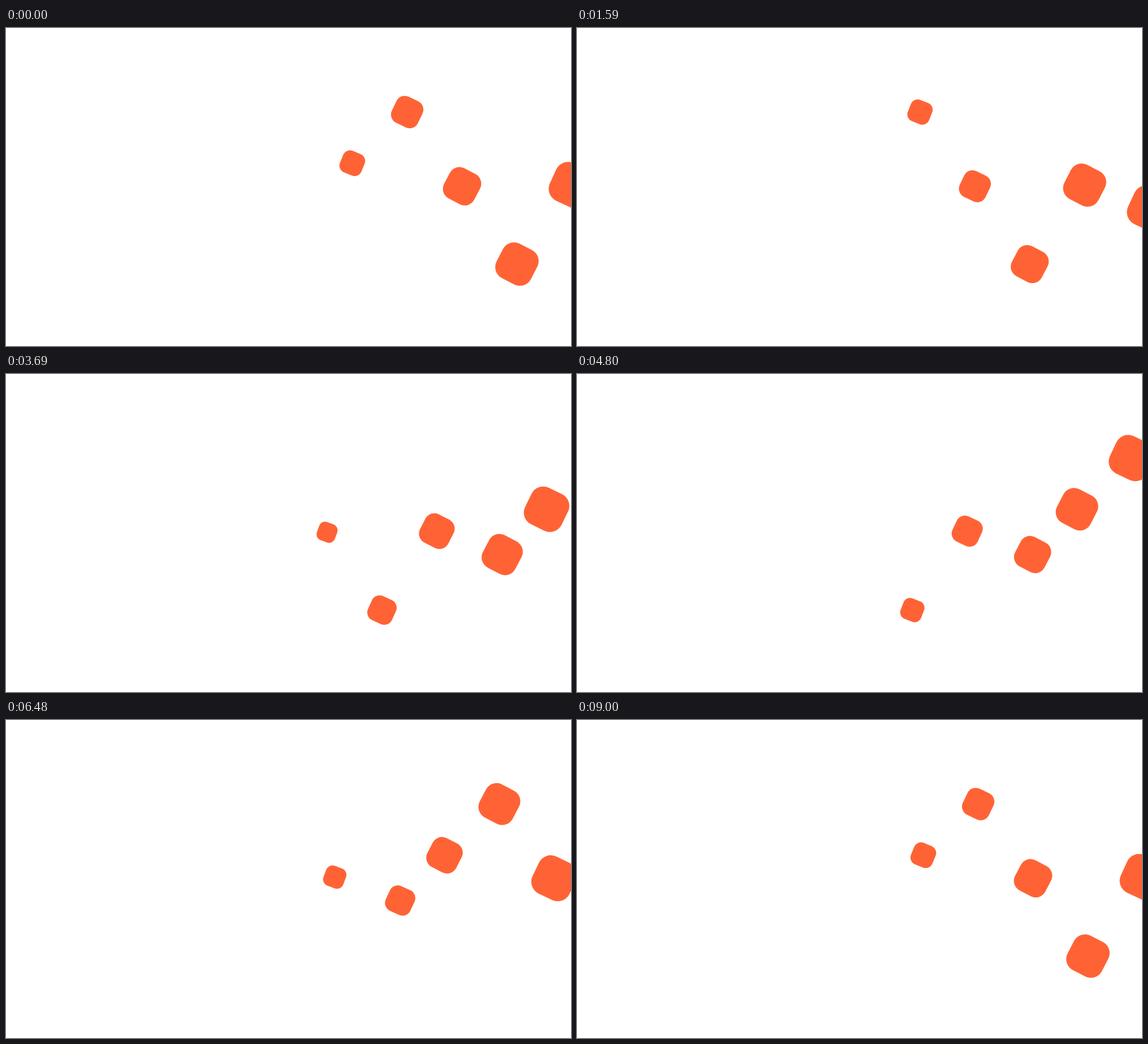
Animation, 998 px wide and 561 px high, one loop 9030 ms. Source, as an HTML page:

```html
<!DOCTYPE html>
<html lang="en">
<head>
<meta charset="utf-8">
<title>Drifting tiles</title>
<style>
html, body { margin: 0; width: 100%; height: 100%; overflow: hidden; background: #fff; }
svg { display: block; width: 998px; height: 561px; }
</style>
</head>
<body>
<svg viewBox="0 0 998 561" fill="#ff6335"></svg>
<script>
const LOOP = 9030, CYCLE = 9000, STEP = 30;
const LEFT = 527, SPAN = 581.6, FIRST = 84.7;
const RADIUS = 0.32; // corner radius as a share of the side

// Evenly spaced lanes: centre y and an optional shift to the right.
const lanes = [
  { y: 238.6 }, { y: 148.3 }, { y: 279.2 },
  { y: 416.5 }, { y: 277.2 }, { y: 318.5, shift: 18.6 }
];

// Overall width at distance d from the vanishing point: a slow shrink
// on the way, then a quick ease to nothing.
function widthAt(d) {
  const slow = 81.8 - 0.0165 * Math.max(0, 458 - d) ** 1.3;
  const fade = 1 - Math.max(0, 1 - d / 65) ** 3;
  return slow * fade;
}

// Tilt in degrees: swings out and back once.
const tiltAt = d => 18 + 9.8 * Math.sin(Math.PI * d / 620);

const svg = document.querySelector('svg');
const tiles = lanes.map(() => svg.appendChild(document.createElementNS(svg.namespaceURI, 'rect')));

function place(tile, lane, i, time) {
  const travel = FIRST + SPAN * (i / lanes.length - time / CYCLE);
  const d = (travel % SPAN + SPAN) % SPAN;
  const tilt = tiltAt(d), a = tilt * Math.PI / 180;
  const reach = (1 - 2 * RADIUS) * (Math.cos(a) + Math.sin(a)) + 2 * RADIUS;
  const side = widthAt(d) / reach;
  const set = (name, value) => tile.setAttribute(name, value);
  set('x', -side / 2);
  set('y', -side / 2);
  set('width', side);
  set('height', side);
  set('rx', side * RADIUS);
  set('transform', `translate(${LEFT + d + (lane.shift || 0)} ${lane.y}) rotate(${tilt})`);
}

const start = performance.now();
function draw() {
  const time = Math.floor((performance.now() - start) % LOOP / STEP) * STEP;
  lanes.forEach((lane, i) => place(tiles[i], lane, i, time));
  requestAnimationFrame(draw);
}
draw();
</script>
</body>
</html>
```
